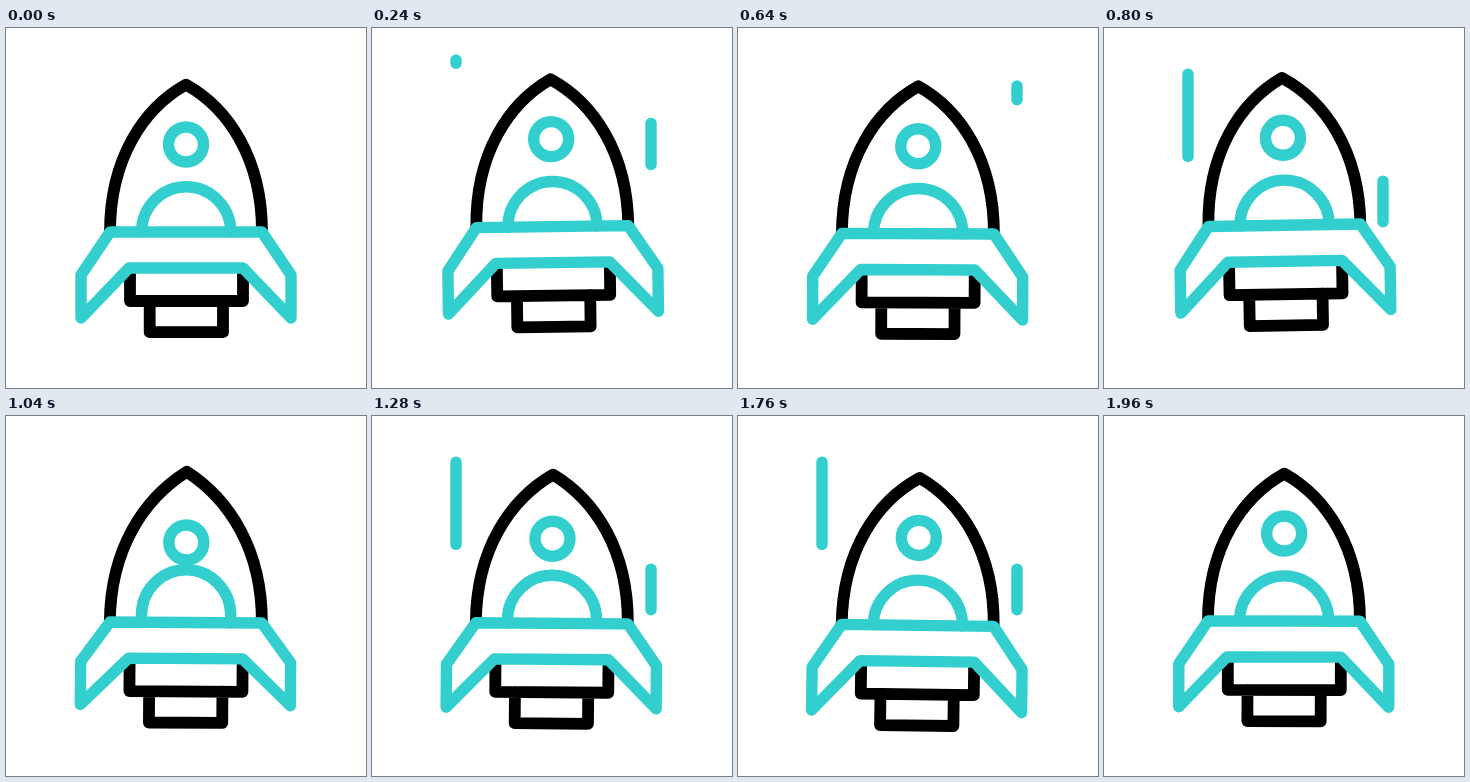
Animation of 360 by 360 pixels, one loop 2000 ms. Source, as an HTML page:

```html
<!DOCTYPE html>
<html lang="en">
<head>
<meta charset="utf-8">
<title>Rocket</title>
<style>
  html, body { margin: 0; width: 100%; height: 100%; overflow: hidden; background: #fff; }
  svg { display: block; width: 100vw; height: 100vh; }
  path, circle { fill: none; stroke-linecap: round; stroke-linejoin: round; }
  .dark { stroke: #000; stroke-width: 11.8; }
  .teal { stroke: #33cfcf; stroke-width: 11.4; }
</style>
</head>
<body>
<svg viewBox="0 0 360 360">
  <path id="left" class="teal"/>
  <path id="right" class="teal"/>
  <g id="ship">
    <path id="hull" class="dark"/>
    <path class="dark" d="M124 242V273H237V242M143.7 273V304.2H217V273"/>
    <circle id="head" class="teal" cx="180" cy="116.5" r="17.5"/>
    <path id="body" class="teal"/>
    <path id="wings" class="teal"/>
  </g>
</svg>
<script>
const LOOP = 2000, STEP = 40, STREAK_LOOP = 480;
const $ = id => document.getElementById(id);
const setPath = (id, d) => $(id).setAttribute('d', d);

// Smooth progress from time a to time b
function ease(t, a, b) {
  const p = Math.min(1, Math.max(0, (t - a) / (b - a)));
  return p * p * (3 - 2 * p);
}

// Ship sway in -1..1, easing between turning points
function sway(t) {
  const keys = [[0, 0]];
  for (let i = 0; i < 6; i++) keys.push([LOOP * (2 * i + 1) / 12, i % 2 ? 1 : -1]);
  keys.push([LOOP, 0]);
  const i = keys.findIndex(k => k[0] > t);
  const [a, from] = keys[i - 1], [b, to] = keys[i];
  return from + (to - from) * ease(t, a, b);
}

// A streak whose lower end runs ahead of its upper end
function streak(id, x, top, bottom, front, back, t) {
  const head = ease(t, ...front), tail = ease(t, ...back);
  const y = u => top + (bottom - top) * u;
  const visible = head > 0 && tail < 1;
  setPath(id, visible ? `M${x} ${y(tail)}L${x} ${y(head) + 0.01}` : '');
}

function draw(t) {
  const s = sway(t);
  $('ship').setAttribute('transform', `translate(0 ${7.1 * s}) rotate(${s} 180 180)`);

  // The nose and wing tips lift while head and body meet
  const nod = 7.5 * (ease(t, 833, 1020) - ease(t, 1130, 1390));
  const lift = 0.45 * nod;
  $('head').setAttribute('cy', 116.5 + nod);
  setPath('body', `M135.6 204V${204 - nod}a44.6 45.2 0 0 1 89.2 0V204`);
  setPath('hull', `M104 204C104 130 138 80 180 ${56.6 - lift}C222 80 256 130 256 204`);
  setPath('wings', `M104 204H256L285 ${247 - lift}V${290 - lift}L237 240H123L75 ${290 - lift}V${247 - lift}Z`);

  const p = t % STREAK_LOOP;
  streak('left', 84, 32, 185, [226, 386], [290, 450], p);
  streak('right', 279, 56, 200, [111, 350], [140, 431], p);
}

function frame(now) {
  draw(Math.floor((now - start) % LOOP / STEP) * STEP);
  requestAnimationFrame(frame);
}

const start = performance.now();
draw(0);
requestAnimationFrame(now => frame(Math.max(now, start)));
</script>
</body>
</html>
```
